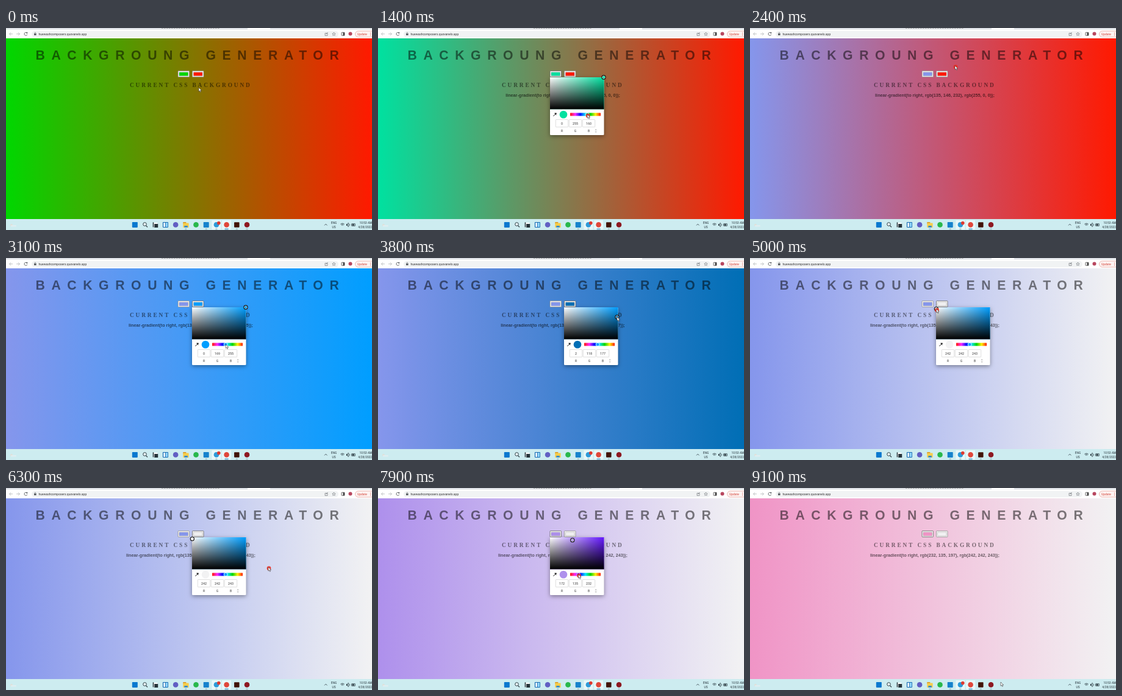
These frames come from a looping animation (600x332 px, 9200 ms). An HTML page with a canvas:

```html
<!DOCTYPE html>
<html lang="en">
<head>
<meta charset="utf-8">
<title>Gradient picker</title>
<style>
html, body { margin: 0; width: 100%; height: 100%; overflow: hidden; background: #fff; }
canvas { display: block; width: 600px; height: 332px; }
</style>
</head>
<body>
<canvas id="stage" width="600" height="332"></canvas>
<script>
const ctx = document.getElementById('stage').getContext('2d');
const LOOP = 9200, STEP = 100, GLIDE = 300;
const SANS = '"Liberation Sans", Arial, sans-serif';
const SERIF = '"Liberation Serif", Times, serif';
const UI = 'Roboto, "Open Sans", sans-serif';
const INK = '#26343b', GREY = '#5f6368';

const clamp = v => Math.max(0, Math.min(1, v));
const part = (t, a, b) => clamp((t - a) / (b - a));
const smooth = p => p * p * (3 - 2 * p);
const mix = (a, b, p) => a + (b - a) * p;

// Hue, saturation and value chosen for each end of the gradient
function leftColor(t) {
  const pick = part(t, 1800, 2000);
  const hue = 120 + 113.2 * part(t, 1300, 1600) + 88.45 * part(t, 7700, 8300);
  return [hue, mix(1, .4181, pick), mix(1, .9098, pick)];
}

function rightColor(t) {
  const pick = part(t, 3200, 3400);
  const s = mix(1, .9887, pick) - .9846 * part(t, 3900, 4815);
  const v = mix(1, .6941, pick) + .2569 * part(t, 4650, 4950);
  return [t < 3000 ? 0 : 200.23, s, v];
}

function rgb([h, s, v]) {
  return [5, 3, 1].map(n => {
    const k = (n + h / 60) % 6;
    return Math.round(255 * v * (1 - s * Math.max(0, Math.min(k, 4 - k, 1))));
  });
}
const css = c => `rgb(${c.join(', ')})`;

// Video colour shift: BT.601 values shown as BT.709
function shown(hsv) {
  const [r, g, b] = rgb(hsv);
  const y = .299 * r + .587 * g + .114 * b;
  const cb = (b - y) / 1.772, cr = (r - y) / 1.402;
  return css([y + 1.5748 * cr, y - .1873 * cb - .4681 * cr, y + 1.8556 * cb].map(Math.round));
}

// Cursor: each stop is an arrival time and a place, fixed or following a handle
const PICK_Y = 81;
const hueX = (x, h) => x + 33 + 50 * (1 - h / 360);
const shadeAt = (x, [, s, v]) => [x + s * 88, PICK_Y + (1 - v) * 52];
const fixed = (x, y) => () => [x, y];
const onHue = (x, color) => t => [hueX(x, color(t)[0]), 142];
const onShade = (x, color) => t => shadeAt(x, color(t + STEP));
const route = [
  [0, fixed(316, 98)],
  [700, fixed(284, 72)],
  [1300, onHue(282, leftColor)],
  [1900, onShade(282, leftColor)],
  [2400, fixed(336, 62)],
  [2700, fixed(314, 74)],
  [3000, onHue(305, rightColor)],
  [3400, onShade(305, rightColor)],
  [6200, fixed(430, 130)],
  [7300, fixed(296, 75)],
  [7700, onHue(282, leftColor)],
  [8900, fixed(411, 319)]
];
const clicks = [900, 2400, 2700, 6300, 7400, 8500];

function cursorAt(t) {
  return route.reduce((pos, [time, place]) => {
    const p = smooth(part(t, time - GLIDE, time));
    return place(t).map((v, i) => mix(pos[i], v, p));
  }, [316, 98]);
}

function isDown(t) {
  const moving = c => String(c(t)) !== String(c(t - STEP));
  return clicks.includes(t) || moving(leftColor) || moving(rightColor);
}

function rect(x, y, w, h, fill, r = 0) {
  ctx.fillStyle = fill;
  ctx.beginPath();
  ctx.roundRect(x, y, w, h, r);
  ctx.fill();
}

function frame(x, y, w, h, color, r = 0, width = .7) {
  ctx.strokeStyle = color;
  ctx.lineWidth = width;
  ctx.beginPath();
  ctx.roundRect(x, y, w, h, r);
  ctx.stroke();
}

function dot(x, y, r, fill, stroke, width = 1) {
  ctx.beginPath();
  ctx.arc(x, y, r, 0, 7);
  if (fill) { ctx.fillStyle = fill; ctx.fill(); }
  if (stroke) { ctx.strokeStyle = stroke; ctx.lineWidth = width; ctx.stroke(); }
}

function arc(x, y, r, from, to, color, width = .7) {
  ctx.strokeStyle = color;
  ctx.lineWidth = width;
  ctx.beginPath();
  ctx.arc(x, y, r, from, to);
  ctx.stroke();
}

function line(color, width, ...pts) {
  ctx.strokeStyle = color;
  ctx.lineWidth = width;
  ctx.beginPath();
  pts.forEach(([x, y]) => ctx.lineTo(x, y));
  ctx.stroke();
}

// Arrow head pointing along (dx, dy)
function chevron(x, y, dx, dy, size, color, width) {
  line(color, width, [x - dx * size - dy * size, y - dy * size - dx * size], [x, y],
    [x - dx * size + dy * size, y - dy * size + dx * size]);
}

function text(str, x, y, font, fill, align = 'left', spacing = 0) {
  ctx.font = font;
  ctx.fillStyle = fill;
  ctx.textAlign = align;
  ctx.letterSpacing = spacing + 'px';
  ctx.fillText(str, x, y);
}

function ramp(x0, y0, x1, y1, colors) {
  const g = ctx.createLinearGradient(x0, y0, x1, y1);
  colors.forEach((c, i) => g.addColorStop(i / (colors.length - 1), c));
  return g;
}

function star(x, y, r) {
  const pts = Array.from({ length: 11 }, (_, i) => {
    const d = i % 2 ? r / 2 : r, a = i * Math.PI / 5 - Math.PI / 2;
    return [x + d * Math.cos(a), y + d * Math.sin(a)];
  });
  line(GREY, .6, ...pts);
}

function toolbar() {
  rect(0, 0, 600, 17, '#fff');
  rect(0, 0, 600, 2.5, '#dee1e6');
  rect(396, 0, 37, 2.5, '#fff');
  for (let x = 255; x < 348; x += 4) rect(x, 0, 2.6, .7, '#8a8a8a');
  chevron(5.5, 9.8, -1, 0, 2.5, '#b8bbbe', .9);
  chevron(22.5, 9.8, 1, 0, 2.5, '#b8bbbe', .9);
  for (const x of [5.5, 17]) line('#b8bbbe', .9, [x, 9.8], [x + 5.5, 9.8]);
  arc(32.5, 9.8, 2.5, .3, 5.5, GREY, .9);
  rect(33.3, 7, 2, 2, GREY);

  rect(42, 4.7, 503, 10.6, '#f1f3f4', 5.3);
  rect(46, 9, 3.6, 3, GREY);
  frame(46.8, 7.3, 2, 2.6, GREY, 1, .6);
  text('huewashcomposers.quovanels.app', 53.5, 11.8, '5px ' + UI, '#333');
  frame(523, 8.5, 4, 4, GREY, 0, .6);
  line(GREY, .7, [524.5, 10.5], [527.5, 7.2]);
  star(537.5, 10, 2.8);

  frame(550, 7.3, 5, 5, '#444', .5, .8);
  rect(552.5, 7.3, 2.5, 5, '#444');
  dot(564.5, 9.6, 3, '#b8475f');
  rect(572.5, 5, 32, 10, '#fdf3f2', 5);
  frame(572.5, 5, 32, 10, '#e58a82', 5, .6);
  text('Update', 576, 11.8, '5px ' + UI, '#d34539');
  for (const y of [8, 10, 12]) dot(597.5, y, .5, '#d34539');
}

const slot = i => 211.3 + 16.7 * i;

function taskIcons() {
  const y = 323.4;
  const square = (i, color, size = 9) =>
    rect(slot(i) - size / 2, y - size / 2, size, size, color, .8);
  const disc = (i, color) => dot(slot(i), y, 4.3, color);

  for (const i of [8, 9]) square(i, '#e8f7f9', 15);
  square(0, '#0a78cf');
  dot(slot(1) - .5, y - .9, 2.8, '#e8f8fb', INK, 1);
  line(INK, 1.2, [slot(1) + 1.6, y + 1.4], [slot(1) + 4, y + 4]);
  square(2, '#fff', 7);
  rect(slot(2) - 1.5, y - 1.4, 6, 6, INK);
  rect(slot(2) - 4, y - 4, 1.5, 8, INK);
  square(3, '#176bb4');
  rect(slot(3) - 3.3, y - 3.4, 3, 7, '#eef9ff');
  rect(slot(3) + .6, y - 3.4, 3, 7, '#8fd5fa');
  disc(4, '#625fc3');
  rect(slot(5) - 4.5, y - 4.4, 5, 3, '#d99722');
  rect(slot(5) - 4.5, y - 3, 9.3, 7.5, '#f8cd4a', .7);
  rect(slot(5) - 2.5, y + 1.6, 5.5, 2.8, '#318bd0');
  disc(6, '#28b84b');
  square(7, '#1682cc');
  disc(8, '#2e9bd9');
  dot(slot(8) + 3.9, y - 2.8, 2.8, '#df3a31');
  disc(9, '#e0473b');
  square(10, '#421307', 8.5);
  disc(11, '#8d1820');
  for (const i of [5, 7, 8, 10, 11]) rect(slot(i) - 1.5, 329.8, 3, 1, '#829ba3');
  rect(slot(9) - 3, 329.8, 6, 1, '#1475b8');
}

function tray() {
  const font = '4.8px ' + UI;
  chevron(524.3, 322.2, 0, -1, 2.2, INK, .8);
  text('ENG', 537.5, 322, font, INK, 'center');
  text('US', 537.5, 329, font, INK, 'center');
  for (const r of [1.8, 3.2, 4.6]) arc(551.5, 325.7, r, -2.35, -.8, INK);
  rect(558, 322, 1.7, 3, INK);
  line(INK, .7, [559.5, 322], [561.3, 320.3], [561.3, 326.7], [559.5, 325]);
  arc(561.2, 323.5, 2.3, -1, 1, INK);
  frame(566.5, 321.6, 6, 3.8, INK, .6);
  rect(567.3, 322.4, 3.8, 2.2, INK);
  text('10:53 AM', 600, 322, font, INK, 'right');
  text('4/28/2022', 600, 329, font, INK, 'right');
}

function taskbar() {
  rect(0, 314, 600, 18, '#cdecf0');
  dot(9, 324, 2, '#e0dfd8');
  rect(8, 324, 9, 2.5, '#e0edf0', 1.2);
  taskIcons();
  tray();
}

function swatch(x, color, focus) {
  rect(x, 70.5, 18.5, 10, '#f0efee', .6);
  frame(x, 70.5, 18.5, 10, focus ? '#5c5c5c' : '#8c8c8c', .8, .7);
  rect(x + 2, 72.8, 14.5, 5.8, color);
  frame(x + 2, 72.8, 14.5, 5.8, '#7778', 0, .5);
}

function picker(x, hsv) {
  const y = PICK_Y, w = 88.5, h = 52.5;
  const pure = shown([hsv[0], 1, 1]), color = shown(hsv);
  ctx.save();
  ctx.shadowColor = 'rgba(0,0,0,.4)';
  ctx.shadowBlur = 7;
  ctx.shadowOffsetY = 2;
  rect(x, y, w, 95, '#fff', 1.5);
  ctx.restore();
  rect(x, y, w, h, pure);
  rect(x, y, w, h, ramp(x, 0, x + w, 0, ['#fff', 'rgba(255,255,255,0)']));
  rect(x, y, w, h, ramp(0, y, 0, y + h, ['rgba(0,0,0,0)', '#000']));

  line('#222', 1, [x + 5.3, 145], [x + 9.3, 141]);
  line('#222', 2.2, [x + 8.6, 141.6], [x + 10.3, 139.9]);
  line('#222', 1, [x + 7.2, 139.8], [x + 10.3, 142.9]);
  dot(x + 22, 142.3, 6.3, color);
  const hues = Array.from({ length: 7 }, (_, i) => shown([360 - 60 * i, 1, 1]));
  rect(x + 33, 139.6, 50, 5, ramp(x + 33, 0, x + 83, 0, hues), .5);
  dot(hueX(x, hsv[0]), 142.1, 2.8, pure, '#fff', .8);

  rgb(hsv).forEach((n, i) => {
    const cx = x + 19.5 + i * 22;
    frame(cx - 10.2, 150.5, 20.4, 12.3, '#d2d2d2', .8);
    text(n, cx, 158.6, '5.3px ' + UI, '#333', 'center');
    text('RGB'[i], cx, 170.8, '5px ' + UI, '#333', 'center');
  });
  chevron(x + 75.2, 166.9, 0, -1, 1.2, '#555', .6);
  chevron(x + 75.2, 171.3, 0, 1, 1.2, '#555', .6);

  const [hx, hy] = shadeAt(x, hsv);
  dot(hx, hy, 3, color, '#111', 1.3);
  dot(hx, hy, 2.2, null, '#fff', .6);
}

function pointer([x, y], down) {
  if (down) dot(x + 1, y + 2, 3.4, 'rgba(238,38,25,.85)');
  ctx.save();
  ctx.translate(x, y);
  const arrow = new Path2D('M0 0V6.3L1.5 5 2.6 7.4 3.6 6.9 2.6 4.6H4.6Z');
  ctx.fillStyle = '#fff';
  ctx.fill(arrow);
  ctx.strokeStyle = '#333';
  ctx.lineWidth = .6;
  ctx.stroke(arrow);
  ctx.restore();
}

function draw(t) {
  const left = leftColor(t), right = rightColor(t);
  const leftOpen = t >= 1000 && t < 2400 || t >= 7400 && t < 8500;
  const rightOpen = t >= 2800 && t < 6400;

  rect(0, 0, 600, 332, ramp(0, 0, 600, 0, [shown(left), shown(right)]));
  toolbar();
  taskbar();
  text('BACKGROUNG GENERATOR', 48.5, 51.6, 'bold 21.2px ' + SANS, 'rgba(0,0,0,.5)', 'left', 10.6);
  swatch(282, shown(left), leftOpen || t >= 7200);
  swatch(305.5, shown(right), rightOpen);
  text('CURRENT CSS BACKGROUND', 203, 96.6, 'bold 9.3px ' + SERIF, 'rgba(0,0,0,.5)', 'left', 2.9);
  if (t > 1300) {
    text(`linear-gradient(to right, ${css(rgb(left))}, ${css(rgb(right))});`, 303, 113.2,
      'bold 7.24px ' + SANS, 'rgba(0,0,0,.57)', 'center');
  }
  if (leftOpen) picker(282, left);
  if (rightOpen) picker(305, right);
  pointer(cursorAt(t), isDown(t));
}

const start = performance.now();
function tick() {
  const t = (performance.now() - start) % LOOP;
  draw(Math.floor(t / STEP) * STEP);
  requestAnimationFrame(tick);
}
tick();
</script>
</body>
</html>
```
